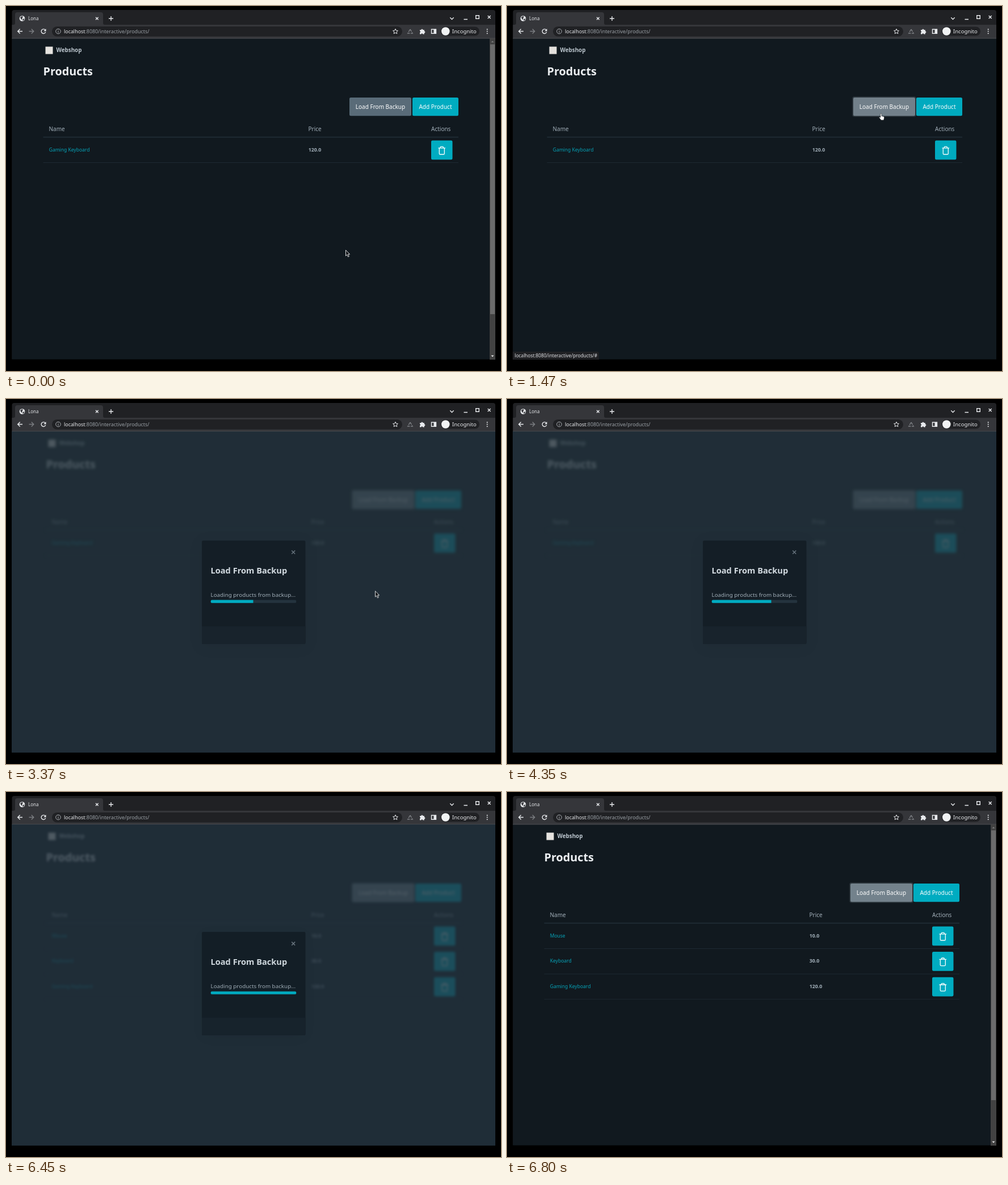
An HTML page that plays this animation: 872x642 px, repeating every 7450 ms.

```html
<!DOCTYPE html>
<html lang="en">
<head>
<meta charset="utf-8">
<title>Webshop</title>
<style>
html, body { margin: 0; width: 100%; height: 100%; overflow: hidden; background: #000; }
body { position: relative; font-family: "Noto Sans", "Open Sans", sans-serif; }
svg, .view, .shade { position: absolute; left: 0; top: 0; }
svg { width: 872px; height: 642px; }
.view { width: 872px; height: 642px; clip-path: inset(57.6px 10px 20.6px 10.5px); background: #11191f; }
.line { fill: none; stroke: #e8eaed; stroke-width: 1.4; }
.dim { stroke: #7b7e82; }
.body { font-size: 10px; fill: #a2afb9; }
.small { font-size: 8.5px; }
.link { fill: #06a3b8; }
.price { font-size: 8.8px; fill: #a2afb9; font-weight: 600; }
.btn { fill: #fff; text-anchor: middle; }
.bold { font-weight: 700; }

/* One shared loop; percentages are ms / 74.5 */
.page, .shade, .modal, .fill, .cursor, .arrow, .hand, .load, .ring, .bar, .status, .added, .last {
  animation: 7450ms ease-in-out infinite;
}
.page { animation-name: blur; }
.shift { animation: shift 7450ms step-end infinite; }
.shade { width: 872px; height: 642px; background: rgba(36, 51, 62, .79); animation-name: shade; }
.modal { animation-name: modal; filter: drop-shadow(0 4px 12px rgba(0, 0, 0, .05)); }
.fill { animation-name: fill; animation-timing-function: step-end; }
.cursor { animation-name: move; }
.arrow { animation-name: arrow; animation-timing-function: step-end; }
.hand { animation-name: hand; animation-timing-function: step-end; }
.load { animation-name: load; }
.ring { animation-name: ring; animation-timing-function: step-end; }
.bar { animation-name: bar; animation-timing-function: step-end; }
.status { animation-name: status; }
.added { animation-name: added; animation-timing-function: step-end; }
.last { animation-name: last; animation-timing-function: step-end; }

@keyframes blur {
  0%, 19.53% { filter: none; }
  22.013%, 86.349% { filter: blur(2.4px); }
  89.034%, 100% { filter: none; }
}
@keyframes shade {
  0%, 19.53% { opacity: 0; }
  22.013%, 86.349% { opacity: 1; }
  89.034%, 100% { opacity: 0; }
}
@keyframes modal {
  0%, 22.013% { opacity: 0; transform: translateY(-182px); }
  24.698%, 86.349% { opacity: 1; transform: none; }
  89.034%, 100% { opacity: 0; transform: translateY(-182px); }
}
@keyframes shift {
  0% { transform: none; }
  19.329% { transform: translateX(5px); }
  89.128%, 100% { transform: none; }
}
@keyframes bar {
  0% { opacity: 1; }
  19.329% { opacity: 0; }
  89.128%, 100% { opacity: 1; }
}
@keyframes fill {
  0% { width: 15px; }
  25.36% { width: 30px; }
  32.07% { width: 45px; }
  38.78% { width: 60px; }
  45.22% { width: 75px; }
  51.93% { width: 90px; }
  58.38% { width: 105px; }
  65.22% { width: 120px; }
  71.93% { width: 135px; }
  78.51%, 100% { width: 151px; }
}
@keyframes move {
  0%, 6.443% { transform: translate(598px, 429px); }
  16.242% { transform: translate(660px, 181px); }
  19.329%, 20.134% { transform: translate(659px, 189px); animation-timing-function: cubic-bezier(.5, 0, .75, .75); }
  24.698% { transform: translate(650px, 294px); animation-timing-function: cubic-bezier(.3, .4, .6, 1); }
  26.711% { transform: translate(650px, 335.5px); animation-timing-function: step-end; }
  27.91%, 100% { transform: translate(650px, 337.5px); }
}
@keyframes arrow {
  0% { opacity: 1; }
  15.705% { opacity: 0; }
  20.537% { opacity: 1; }
  55.3%, 100% { opacity: 0; }
}
@keyframes hand {
  0% { opacity: 0; }
  15.705% { opacity: 1; }
  20.537%, 100% { opacity: 0; }
}
@keyframes load {
  0%, 15.8% { fill: #596b78; }
  18.4%, 100% { fill: #73828c; }
}
@keyframes ring {
  0% { opacity: 0; }
  19.329%, 100% { opacity: 1; }
}
@keyframes status {
  0%, 17.2% { opacity: 0; }
  18.389%, 20.537% { opacity: 1; }
  22.013%, 100% { opacity: 0; }
}
@keyframes added {
  0% { opacity: 0; }
  86.349%, 100% { opacity: 1; }
}
@keyframes last {
  0% { transform: none; }
  86.349%, 100% { transform: translateY(89.2px); }
}
</style>
</head>
<body>

<!-- Browser frame -->
<svg viewBox="0 0 872 642">
  <path fill="#202124" d="M10.500 621V11q0-4 4-4H858q4 0 4 4V621Z"/>
  <path fill="#35363a" d="M10.500 33h2.500q3 0 3-3V15q0-4 4-4H167q4 0 4 4V30q0 3 3 3H862V58H10.500Z"/>
  <path fill="#56575a" d="M10.500 56.600H862v1H10.500Z"/>
  <rect x="81" y="36" width="617" height="17.5" rx="8.7" fill="#202124"/>
  <rect x="766" y="36.5" width="68" height="16" rx="8" fill="#202124"/>

  <circle cx="28.5" cy="22" r="4.8" fill="#e8eaed"/>
  <path fill="#35363a" d="M25 20q2-2 4-2l1 2-2 1 1 2-2 1ZM29.5 23l3-1-1 3-2 1Z"/>
  <text x="39" y="25" font-size="8" fill="#e3e5e8">Lona</text>
  <g class="line">
    <path d="M158 19.700l4.600 4.600m0-4.600l-4.600 4.600"/>
    <path d="M181 22h8m-4-4v8"/>
    <path d="M782.300 20.300l3.200 3.200 3.200-3.200"/>
    <path d="M806.500 23.500h6.500M827.700 16.700h5.600v5.600h-5.600ZM848.700 17l5 5m0-5l-5 5"/>
    <path d="M29 44.500h-8.300m4-4l-4 4 4 4"/>
    <path class="dim" d="M40.500 44.500h8.300m-4-4l4 4-4 4"/>
    <path d="M69.200 42.200a3.900 3.900 0 1 0 .6 3.400"/>
  </g>
  <path fill="#e8eaed" d="M70.500 40v4.200h-4.200Z"/>
  <g class="line" style="stroke:#aeb2b7;stroke-width:1">
    <circle cx="92" cy="44.500" r="4.300"/>
    <path d="M92 44v3m0-5v1"/>
  </g>
  <text x="102" y="47.700" font-size="8.870" fill="#9aa0a6"><tspan fill="#e8eaed">localhost</tspan>:8080/interactive/products/</text>
  <path class="line" style="stroke-width:1" d="M686 40.200l1.300 2.900 3.100.3-2.300 2.100.7 3.100-2.800-1.600-2.800 1.600.7-3.100-2.300-2.100 3.100-.3Z"/>
  <path class="line dim" stroke-dasharray="5 1.500" d="M712 40.800l4.200 7.200h-8.400Z"/>
  <path fill="#e8eaed" d="M729 42h2.300a1.600 1.600 0 0 1 3.200 0h2.300v2.200a1.600 1.600 0 0 1 0 3.200v2h-2.600a1.400 1.400 0 0 0-2.700 0H729v-2.600a1.400 1.400 0 0 0 0-2.700Z"/>
  <path class="line" d="M749.500 41h8v7.300h-8Z"/>
  <path fill="#e8eaed" d="M753.500 41h4v7.300h-4Z"/>
  <circle cx="774.300" cy="44.500" r="7.300" fill="#f1f3f4"/>
  <text x="786" y="47.800" font-size="9.500" fill="#e8eaed">Incognito</text>
  <path stroke="#e8eaed" stroke-width="2" stroke-linecap="round" d="M847.700 41h0m0 3.600h0m0 3.600h0"/>
</svg>

<div class="view">
  <svg class="page" viewBox="0 0 872 642">
    <defs>
      <g id="trash">
        <rect x="749" y="236.500" width="37.500" height="33.700" rx="2.300" fill="#00acc1"/>
        <path fill="none" stroke="#fff" stroke-width="1.300" stroke-linejoin="round" stroke-linecap="round"
          d="M762 249.800h11.600M763.300 249.800v9.600q0 1.600 1.600 1.600h5.800q1.600 0 1.600-1.600v-9.600M765.200 249.600v-1q0-1.200 1.200-1.200h2.800q1.200 0 1.200 1.200v1"/>
      </g>
      <path id="rule" stroke="#1e2a33" d="M65.500 275.500H797"/>
    </defs>
    <g class="shift">
      <rect x="69.500" y="71.500" width="13" height="13" fill="#e6e3df"/>
      <text class="bold" x="88.500" y="80.800" font-size="9.800" fill="#bdc7cf">Webshop</text>
      <text class="bold" x="65.500" y="122" font-size="19.800" fill="#edf0f3">Products</text>

      <rect class="ring" x="603.300" y="159.300" width="112.400" height="35.400" rx="3.500" fill="#73828c" fill-opacity=".3"/>
      <rect class="load" x="605" y="161" width="109" height="32.300" rx="2.300"/>
      <rect x="716" y="161" width="81" height="32.300" rx="2.300" fill="#00acc1"/>
      <text class="body btn" x="659.500" y="180.700">Load From Backup</text>
      <text class="body btn" x="756.500" y="180.700">Add Product</text>

      <text class="body" x="75.500" y="220.200">Name</text>
      <text class="body" x="532.500" y="220.200">Price</text>
      <text class="body" x="749" y="220.200">Actions</text>
      <path stroke="#202d36" stroke-width="1.800" d="M65.500 230.700H797"/>

      <g class="small">
        <g class="added">
          <text class="link" x="75.700" y="255.900">Mouse</text>
          <text class="price" x="532.700" y="255.900">10.0</text>
          <use href="#trash"/><use href="#rule"/>
          <g transform="translate(0 44.600)">
            <text class="link" x="75.700" y="255.900">Keyboard</text>
            <text class="price" x="532.700" y="255.900">30.0</text>
            <use href="#trash"/><use href="#rule"/>
          </g>
        </g>
        <g class="last">
          <text class="link" x="75.700" y="255.900">Gaming Keyboard</text>
          <text class="price" x="532.700" y="255.900">120.0</text>
          <use href="#trash"/><use href="#rule"/>
        </g>
      </g>
    </g>
  </svg>

  <svg class="bar" viewBox="0 0 872 642">
    <path fill="#424242" d="M852 57h10v565h-10Z"/>
    <path fill="#6b6b6b" d="M853 67.500h8V542h-8Z"/>
    <path fill="#7c7c7c" d="M854.500 64l2.500-2.800 2.500 2.800Z"/>
    <path fill="#f0f0f0" d="M854.500 614.500l2.500 2.800 2.500-2.800Z"/>
  </svg>

  <div class="shade"></div>

  <svg class="modal" viewBox="0 0 872 642">
    <clipPath id="track"><rect x="360.500" y="353.600" width="151" height="5.100" rx="2.500"/></clipPath>
    <rect x="345" y="249" width="182.500" height="182" rx="2.500" fill="#141e26"/>
    <path fill="#18232c" d="M345 400h182.500v28.500q0 2.500-2.500 2.500H347.500q-2.500 0-2.500-2.500Z"/>
    <path stroke="#66727c" stroke-width="1.600" d="M503.200 266.500l6 6m0-6l-6 6"/>
    <text class="bold" x="360.500" y="307" font-size="14.600" fill="#d3dbe1">Load From Backup</text>
    <text x="360.500" y="348.200" font-size="9.820" fill="#a2afb9">Loading products from backup...</text>
    <g clip-path="url(#track)">
      <rect x="360.500" y="353" width="151" height="6" fill="#24333e"/>
      <rect class="fill" x="360.500" y="353" height="6" fill="#00acc1"/>
    </g>
  </svg>

  <svg class="status" viewBox="0 0 872 642">
    <path fill="#202124" d="M10 608h149q3 0 3 3v11H10Z"/>
    <text x="13.500" y="617.600" font-size="8.250" fill="#dfe1e5">localhost:8080/interactive/products/#</text>
  </svg>
</div>

<svg viewBox="0 0 872 642">
  <g class="cursor">
    <path class="arrow" fill="#15181b" stroke="#eceeef" stroke-width=".9" stroke-linejoin="round"
      d="M.5 .3V10.500L2.800 8.400 4.500 12.200 6.300 11.400 4.600 7.700H7.700Z"/>
    <path class="hand" fill="#fff" stroke="#22282d" stroke-width=".6" stroke-linejoin="round"
      d="M-1.100 1.200q0-1.200 1-1.200t1 1.200V4.500l3.400.8q1.300.4 1.200 1.800-.1 2.500-1 4.700H0q-1.400-2.400-3.300-4.400-.4-1.200.8-1.200l1.400 1Z"/>
  </g>
</svg>

</body>
</html>
```
